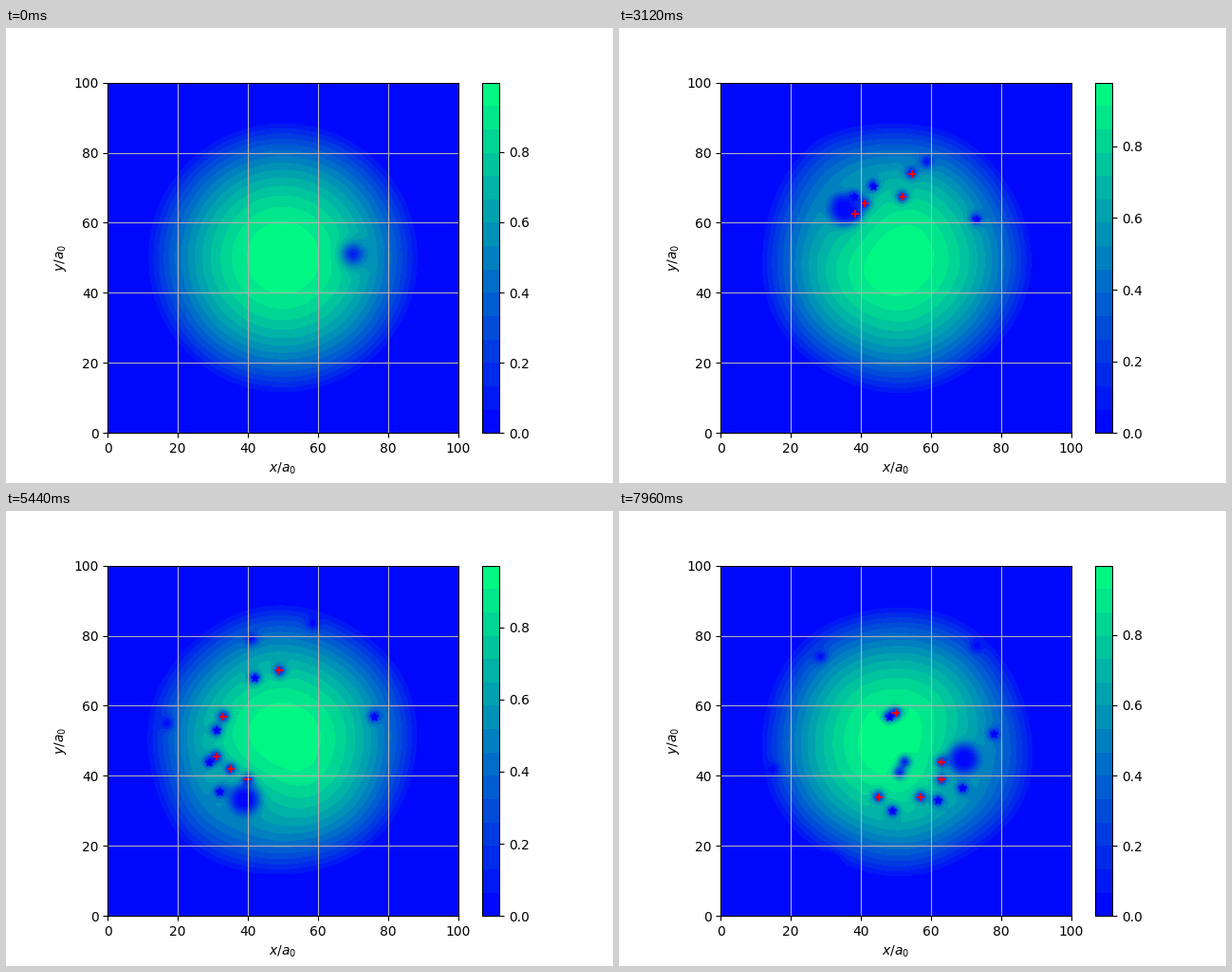
Animation, 640 px wide and 480 px high, one loop 8000 ms. Source, as a matplotlib script:

```python
import numpy as np
import matplotlib.pyplot as plt
from matplotlib.animation import FuncAnimation

FRAMES, STEP_MS = 200, 40
KEYS = np.array([0, 33, 56, 100, 136, 175, 199])
PEAKS = [0.998, 0.991, 0.978, 0.978, 0.971, 0.971, 0.998]
LEVELS = np.linspace(0, 1, 16)
TICKS = np.array([0, 0.2, 0.4, 0.6, 0.8])
CENTRE = 50 + 50j
RADIUS = 39.55

# (birth frame, last marked frame, marked again from, positions at the key frames after birth)
PLUS = [
    (22, 999, 999, [62 + 61j, 54.5 + 65j, 51 + 69j, 49 + 70j, 47 + 66j, 50 + 58j]),
    (18, 110, 999, [66.5 + 63j, 61 + 69j, 48 + 78j, 41 + 79j, 33 + 77j, 28.5 + 74j]),
    (62, 185, 999, [37 + 64j, 33 + 57j, 39 + 50j, 52.5 + 44j]),
    (74, 150, 999, [36 + 59j, 31 + 45.5j, 35 + 24j, 31 + 17j]),
    (88, 999, 999, [36 + 54j, 35 + 42j, 42 + 36j, 45 + 34j]),
    (118, 999, 999, [40 + 39j, 50.5 + 35j, 57 + 34j]),
    (182, 999, 999, [63 + 39j]),
    (190, 999, 999, [63 + 44j]),
]
MINUS = [
    (14, 150, 190, [72 + 58.5j, 72 + 61j, 74 + 60j, 76 + 57j, 77 + 53.5j, 78 + 52j]),
    (18, 45, 999, [69 + 66j, 63.5 + 72j, 56 + 81.5j, 58.5 + 83.5j, 66.5 + 82j, 73 + 77j]),
    (58, 999, 999, [42 + 69j, 42 + 68j, 44 + 65j, 48 + 57j]),
    (66, 185, 999, [35 + 62j, 31 + 53j, 38 + 48j, 51 + 41j]),
    (76, 112, 999, [29 + 61j, 17 + 55j, 18 + 47j, 15 + 42j]),
    (105, 150, 999, [29 + 44j, 37 + 22.5j, 33 + 16j]),
    (112, 999, 999, [32 + 35.5j, 44 + 29j, 49 + 30j]),
    (150, 999, 999, [58 + 28j, 62 + 33j]),
    (184, 999, 999, [69 + 36.5j]),
]


def stir_angle(k):
    return 0.03 * k + 0.05


def stirrer(k, radius=20):
    return CENTRE + radius * np.exp(1j * stir_angle(k))


def smooth_path(times, points):
    """Cubic Hermite curve through the points, sampled at every frame."""
    times, points = np.asarray(times, float), np.asarray(points)
    slope = np.gradient(points, times)
    k = np.arange(FRAMES)
    i = np.clip(np.searchsorted(times, k, side="right") - 1, 0, len(times) - 2)
    h = times[i + 1] - times[i]
    u = np.clip((k - times[i]) / h, 0, 1)
    return ((1 + 2 * u) * (1 - u) ** 2 * points[i] + u * (1 - u) ** 2 * h * slope[i]
            + u * u * (3 - 2 * u) * points[i + 1] + u * u * (u - 1) * h * slope[i + 1])


def build(tracks, radius):
    """Each vortex is shed at the stirrer, on its inner or outer side."""
    out = []
    for birth, end, back, points in tracks:
        times = np.r_[birth, KEYS[KEYS > birth]]
        path = smooth_path(times, np.r_[stirrer(birth, radius), points])
        out.append((birth, end, back, path))
    return out


plus, minus = build(PLUS, 17), build(MINUS, 23)

axis = np.linspace(0, 100, 101)
grid = axis[None, :] + 1j * axis[:, None]
dist = np.abs(grid - CENTRE)
theta = np.angle(grid - CENTRE)


def bump(centre, size, power=2):
    return np.exp(-(np.abs(grid - centre) / size) ** power)


def density(k):
    ramp = min(k / 30, 1)
    lag = np.angle(np.exp(1j * (stir_angle(k) - theta)))

    # cloud with a soft rim that bulges a little behind the stirrer
    rim = RADIUS + ramp * (1.7 * np.exp(-((lag - 0.25) / 0.4) ** 2)
                           + 0.35 * np.sin(5 * theta - 0.05 * k))
    n = 0.02 * np.logaddexp(0, (1 - (dist / rim) ** 2) / 0.02)

    spot = stirrer(k)
    n *= 1 - 0.16 * ramp * bump(spot, 12)
    n *= 1 - (0.88 + 0.12 * ramp) * bump(spot, 3.3 + 1.3 * ramp, 2 + 1.4 * ramp)

    pulse = 0.5 + 0.5 * np.cos(2 * np.pi * (k - 56) / 59.5)
    n *= 1 - 0.75 * ramp * pulse * np.exp(-((dist - 20.5) / 1.5) ** 2
                                          - ((lag - 0.3) / 0.14) ** 2)
    for birth, _, _, path in plus + minus:
        if k >= birth:
            n *= 1 - min((k - birth + 1) / 6, 1) * bump(path[k], 1.75)
    return np.clip(n / n.max(), 0, 0.9999)


def marks(tracks, k):
    pts = [path[k] for birth, end, back, path in tracks
           if k > birth + 3 and (k <= end or k >= back)]
    pts = np.round(2 * np.array(pts, complex)) / 2
    return np.c_[pts.real, pts.imag]


def fill(k):
    return ax.contourf(axis, axis, density(k), levels=LEVELS, cmap="winter")


fig, ax = plt.subplots(figsize=(6.4, 4.8), dpi=100)
ax.set_aspect("equal")
layer = fill(0)
bar = fig.colorbar(layer, ax=ax)
ax.set(xlim=(0, 100), ylim=(0, 100), xlabel="$x/a_0$", ylabel="$y/a_0$")
ax.grid(True)
crosses = ax.scatter([], [], c="red", marker="+", zorder=1.2)
stars = ax.scatter([], [], c="blue", marker="*", zorder=1.2)


def draw(k):
    global layer
    layer.remove()
    layer = fill(k)
    crosses.set_offsets(marks(plus, k))
    stars.set_offsets(marks(minus, k))
    peak = np.interp(k, KEYS, PEAKS)
    bar.set_ticks(TICKS / peak, labels=[f"{t:.1f}" for t in TICKS])
    return crosses, stars


anim = FuncAnimation(fig, draw, frames=FRAMES, interval=STEP_MS,
                     repeat=True, repeat_delay=0, blit=False)
plt.show()
```
